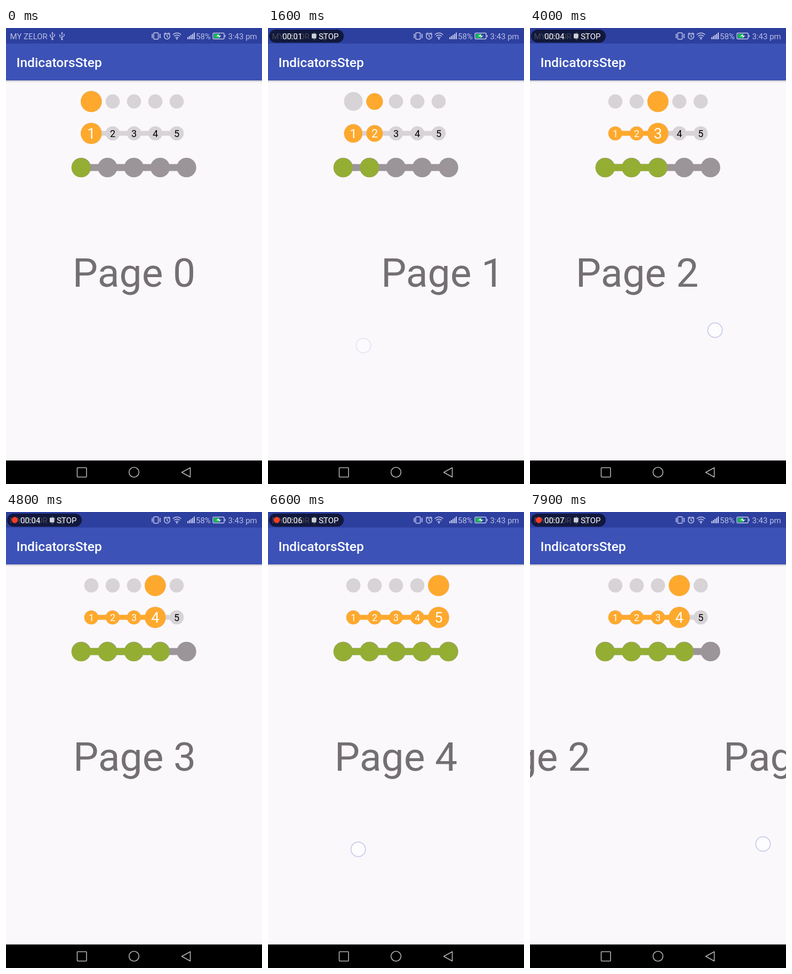
An HTML page that plays this animation: 480x853 px, repeating every 8000 ms.

```html
<!DOCTYPE html>
<html lang="en">
<head>
<meta charset="utf-8">
<title>IndicatorsStep</title>
<style>
  html, body { margin: 0; width: 100%; height: 100%; overflow: hidden; background: #fbf8fc; }
  svg { display: block; width: 100vw; height: 100vh; font-family: Roboto, sans-serif; }
</style>
</head>
<body>
<svg id="stage" viewBox="0 0 480 853">
  <defs>
    <linearGradient id="shade" x2="0" y2="1">
      <stop stop-color="#000" stop-opacity=".25"/>
      <stop offset="1" stop-color="#000" stop-opacity="0"/>
    </linearGradient>
    <g id="usb" fill="none" stroke="#bac0e4" stroke-width="1.2">
      <path d="M0 -5V6M-4 -1V1.5L0 4M4 -2V0L0 2.5"/>
      <path d="M0 -8L2 -4.5H-2Z" fill="#bac0e4" stroke="none"/>
      <circle cy="6" r="1.8" fill="#bac0e4" stroke="none"/>
      <circle cx="-4" cy="-1.5" r="1.2" fill="#bac0e4" stroke="none"/>
      <path d="M3 -3.5H5V-1.5H3Z" fill="#bac0e4" stroke="none"/>
    </g>
  </defs>
  <rect width="480" height="853" fill="#fbf8fc"/>
  <g id="pages" font-size="75" fill="#736f73" text-anchor="middle"></g>
  <g id="steps" text-anchor="middle"></g>
  <circle id="finger" r="13.6" fill="#fff" fill-opacity=".5" stroke="#c9cbea" stroke-width="1.8"/>

  <rect y="97" width="480" height="5" fill="url(#shade)"/>
  <rect width="480" height="98" fill="#3c52b6"/>
  <rect width="480" height="29" fill="#2d3f9f"/>
  <text x="19.5" y="73" font-size="24.6" font-weight="500" fill="#fff">IndicatorsStep</text>

  <g font-size="15" fill="#bac0e4">
    <text x="7.5" y="20.5">MY ZELOR</text>
    <use href="#usb" x="87" y="15"/>
    <use href="#usb" x="105" y="15"/>
    <text x="356" y="20.5">58%</text>
    <text x="416.5" y="20.5">3:43 pm</text>
  </g>
  <g fill="none" stroke="#c5caea" stroke-width="1.4">
    <rect x="277" y="9" width="8.5" height="12" rx="1"/>
    <path d="M275 11l-1.5 2 1.5 2-1.5 2 1.5 2M288 11l1.500 2-1.500 2 1.500 2-1.500 2"/>
    <circle cx="302" cy="15.5" r="5.3"/>
    <path d="M302 12V16L304.500 17.500M296 11.500L299.500 8.800M308 11.500L304.500 8.800"/>
    <path d="M312.500 12.500Q320.500 6 328.500 12.500M315 15.500Q320.500 11 326 15.500M317.500 18.200Q320.500 16 323.500 18.200"/>
    <circle cx="320.500" cy="20" r=".9"/>
    <path d="M341 17V21M344 15V21M347 13V21M350 11V21M353 8.500V21" stroke-width="2"/>
    <rect x="388" y="9.500" width="21" height="11" rx="1.500"/>
    <path d="M411 13V17"/>
  </g>
  <rect x="389.500" y="11" width="11" height="8" fill="#19b85b"/>
  <path d="M394 15.500L399 12V14.500H404L399 18V15.500Z" fill="#fff"/>

  <g id="pill" font-size="15" fill="#fff">
    <rect x="2" y="3" width="140" height="24.500" rx="12.200" fill="#000" fill-opacity=".62"/>
    <circle id="blink" cx="16.500" cy="15" r="5.700" fill="#fb3b23"/>
    <text id="clock" x="27" y="20.500"></text>
    <rect x="82" y="10.500" width="8.500" height="9" rx="1" fill="#cfcfd4"/>
    <text x="95" y="20.500">STOP</text>
  </g>

  <rect y="809" width="480" height="44" fill="#000"/>
  <g fill="none" stroke="#b4b4b4" stroke-width="1.600">
    <rect x="133.500" y="822.500" width="17.500" height="17.500" rx="1"/>
    <circle cx="240" cy="831" r="9.300"/>
    <path d="M329.500 831.200L345.500 822.500V840Z" stroke-linejoin="round"/>
  </g>
</svg>
<script>
const LOOP = 8000, TICK = 100, WIDTH = 480, COUNT = 5;
const SLOP = 11, SETTLE = 600, MORPH = 300;
const SMALL = 13.3, BIG = 20;
const ORANGE = '#fea92d', GREEN = '#94ae34', LIGHT = '#d7d3d7', GREY = '#9b959a';

const swipes = [
  { press: 700, release: 1475, x: [390, 179], y: [560, 594], from: 0, to: 1 },
  { press: 2200, release: 2880, x: [377, 123], y: [557, 669], from: 1, to: 2 },
  { press: 3700, release: 4400, x: [397, 167], y: [562, 632], from: 2, to: 3 },
  { press: 5200, release: 5750, x: [390, 130], y: [560, 667], from: 3, to: 4 },
  { press: 6540, release: 6960, x: [162, 400], y: [631, 620], from: 4, to: 3 },
  { press: 7450, release: 7910, x: [188, 447], y: [626, 620.5], from: 3, to: 2 }
];

const $ = id => document.getElementById(id);
const clamp = v => Math.max(0, Math.min(1, v));
const mix = (a, b, k) => a + (b - a) * k;
const range = [...Array(COUNT).keys()];

function add(parent, tag, attrs) {
  const el = document.createElementNS('http://www.w3.org/2000/svg', tag);
  set(el, attrs);
  return parent.appendChild(el);
}
function set(el, attrs) {
  for (const key in attrs) el.setAttribute(key, attrs[key]);
}

const pages = range.map(i => {
  const el = add($('pages'), 'text', { y: 483.5 });
  el.textContent = 'Page ' + i;
  return el;
});

// A row of circles, optionally joined by a bar and numbered.
function makeRow({ x, gap, y, bar, numbered, idle, active }) {
  const root = $('steps');
  const at = i => x + gap * i;
  const line = color => bar && add(root, 'line',
    { x1: x, x2: at(COUNT - 1), y1: y, y2: y, stroke: color, 'stroke-width': bar });
  const dots = color => range.map(i => add(root, 'circle', { cx: at(i), cy: y, fill: color }));
  line(idle);
  const under = dots(idle);
  const fill = line(active);
  const over = dots(active);
  const labels = numbered ? range.map(i => {
    const el = add(root, 'text', { x: at(i) });
    el.textContent = i + 1;
    return el;
  }) : [];
  return (radius, isOn, reach) => {
    if (fill) set(fill, { x2: at(reach) });
    range.forEach(i => {
      const r = radius(i);
      set(under[i], { r });
      set(over[i], { r: isOn(i) ? r - 0.3 : 0, cx: at(i) - 0.2, cy: y + 0.3 });
      if (labels[i]) set(labels[i], {
        'font-size': r * 1.36, y: y + 0.3 + r * 0.485, fill: isOn(i) ? '#fff' : '#000'
      });
    });
  };
}

const plainRow = makeRow({ x: 160, gap: 40, y: 137.3, idle: LIGHT, active: ORANGE });
const numberRow = makeRow({ x: 160, gap: 40, y: 197, bar: 9, numbered: true, idle: LIGHT, active: ORANGE });
const chainRow = makeRow({ x: 141, gap: 49.35, y: 261, bar: 13, idle: GREY, active: GREEN });

function scrollOf(swipe, t) {
  const travel = swipe.x[0] - fingerOf(swipe, t).x;
  const drag = Math.sign(travel) * Math.max(0, Math.abs(travel) - SLOP) / WIDTH;
  const rest = 1 - clamp((t - swipe.release) / SETTLE);
  return mix(swipe.from + drag, swipe.to, 1 - rest ** 5);
}

function fingerOf({ press, release, x, y }, t) {
  const k = clamp((t - press) / (release - press)) ** 1.8;
  return { x: mix(...x, k), y: mix(...y, k * k), alpha: 1 - clamp((t - release) / 220) };
}

function render(t) {
  const current = swipes.filter(s => t >= s.press).pop();
  const scroll = current ? scrollOf(current, t) : 0;
  pages.forEach((el, i) => set(el, { x: WIDTH / 2 + (i - scroll) * WIDTH }));

  const touch = current ? fingerOf(current, t) : { x: 0, y: 0, alpha: 0 };
  set($('finger'), { cx: touch.x, cy: touch.y, opacity: touch.alpha });

  const last = swipes.filter(s => t >= s.release).pop() || { from: 0, to: 0, release: -LOOP };
  const phase = clamp((t - last.release) / MORPH);
  const grow = (1 - Math.cos(Math.PI * phase)) / 2;
  const radius = i => i === last.to ? mix(SMALL, BIG, grow)
    : i === last.from ? mix(BIG, SMALL, grow) : SMALL;
  const reach = phase < 1 ? Math.min(last.from, last.to) : last.to;
  const done = i => i <= last.to;
  plainRow(radius, i => i === last.to, 0);
  numberRow(radius, done, reach);
  chainRow(() => 18.3, done, reach);

  const beat = t % 1500;
  set($('pill'), { opacity: clamp(t / 300) });
  set($('blink'), { opacity: beat >= 200 && beat < 950 ? 1 : 0 });
  $('clock').textContent = '00:0' + Math.floor(t / 1000);
}

const start = performance.now();
function frame() {
  const t = (performance.now() - start) % LOOP;
  render(Math.floor(t / TICK) * TICK);
  requestAnimationFrame(frame);
}
frame();
</script>
</body>
</html>
```
